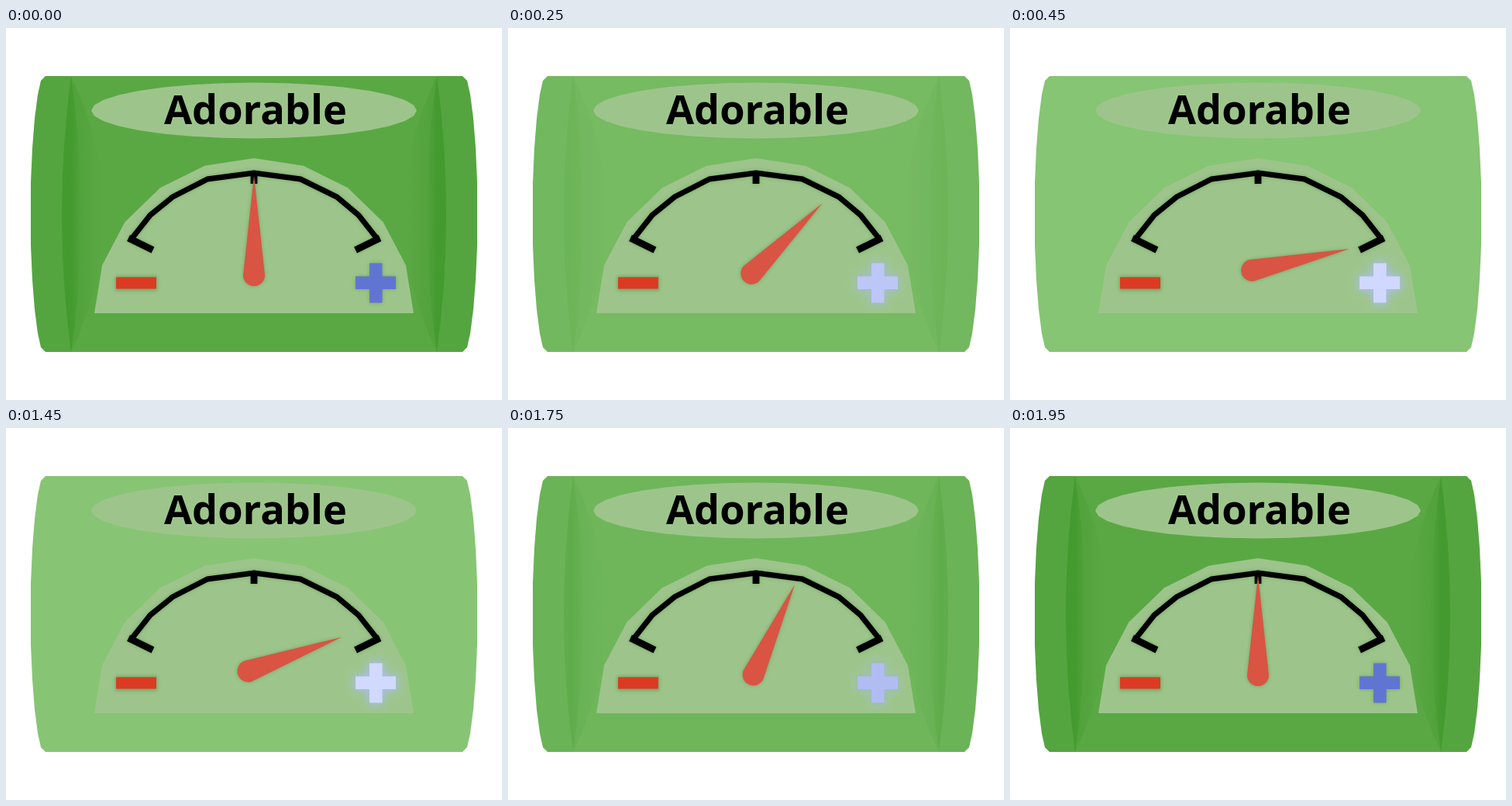
Write an HTML page that moves like this. It is 640 by 480 pixels and loops after 2000 ms.

```html
<!DOCTYPE html>
<html lang="en">
<head>
<meta charset="utf-8">
<title>Adorable meter</title>
<style>
html, body { margin: 0; width: 100%; height: 100%; overflow: hidden; background: #fff; }
svg { display: block; width: 100vw; height: 100vh; }
text { font: bold 52.3px "Open Sans", "Noto Sans", sans-serif; }
</style>
</head>
<body>
<svg viewBox="0 0 640 480">
  <defs>
    <filter id="soft" x="-50%" y="-50%" width="200%" height="200%"><feGaussianBlur stdDeviation="2.4"/></filter>
    <filter id="glow" x="-60%" y="-60%" width="220%" height="220%"><feGaussianBlur stdDeviation="6"/></filter>
    <linearGradient id="fadeIn" gradientUnits="userSpaceOnUse" x1="74" y1="0" x2="125" y2="0">
      <stop offset="0" stop-color="#3a9425" stop-opacity=".4"/>
      <stop offset="1" stop-color="#3a9425" stop-opacity="0"/>
    </linearGradient>
    <linearGradient id="fadeLens" gradientUnits="userSpaceOnUse" x1="70" y1="0" x2="98" y2="0">
      <stop offset="0" stop-color="#3a9425" stop-opacity=".45"/>
      <stop offset=".5" stop-color="#3a9425" stop-opacity=".55"/>
      <stop offset="1" stop-color="#3a9425" stop-opacity="0"/>
    </linearGradient>
    <clipPath id="shell"><path id="shellPath"/></clipPath>
    <g id="crease">
      <path d="M84 62Q60 240 84 418Q170 240 84 62Z" fill="url(#fadeIn)"/>
      <path d="M84 62Q60 240 84 418Q110 240 84 62Z" fill="url(#fadeLens)"/>
      <path d="M84 62Q60 240 84 418H30V62Z" fill="#3a9425" opacity=".17"/>
    </g>
    <path id="plusShape" d="M469 303.500h16.500v17H503v16.500h-17.500v17.500H469V337h-18v-16.500h18Z"/>
    <path id="pointer" d="M0 -120.500L14 8A14 14 0 1 1 -14 8Z"/>
    <g id="scale" fill="none" stroke-linejoin="miter">
      <path d="M162 272L186 241.500L215 218L260 195L320 187L380 195L427 218L455 241.500L479 272" stroke-width="7"/>
      <path d="M158 271L189.500 286.500M482.500 271L451 286.500M320 185V201" stroke-width="8.800"/>
    </g>
  </defs>
  <rect width="640" height="480" fill="#fff"/>
  <path id="body"/>
  <g id="shade" clip-path="url(#shell)">
    <use href="#crease"/>
    <use href="#crease" transform="translate(640) scale(-1 1)"/>
  </g>
  <g fill="#9dc58b">
    <polygon id="badge"/>
    <polygon id="dial"/>
  </g>
  <text x="204" y="124.300">Adorable</text>
  <g filter="url(#soft)" opacity=".55">
    <use href="#scale" stroke="#548a46"/>
    <rect x="141" y="320" width="54" height="19" fill="#548a46"/>
  </g>
  <use id="plusShade" href="#plusShape" fill="#548a46" filter="url(#soft)"/>
  <use id="plusGlow" href="#plusShape" fill="#aebcff" stroke="#aebcff" stroke-width="4" filter="url(#glow)"/>
  <use href="#scale" stroke="#000"/>
  <rect x="142" y="321.500" width="52" height="15" fill="#dc3b22"/>
  <use id="plus" href="#plusShape"/>
  <g id="needle">
    <use href="#pointer" fill="#548a46" opacity=".6" filter="url(#soft)"/>
    <use href="#pointer" fill="#d95443"/>
  </g>
</svg>
<script>
const $ = id => document.getElementById(id);
const STEP = 50, LOOP = 2000, HOLD_FROM = 450, HOLD_TO = 1450;

// Points on an ellipse, every `step` degrees from `from` to `to`.
function ring(cx, cy, rx, ry, step, from, to) {
  const pts = [];
  for (let a = from; a <= to; a += step) {
    const r = a * Math.PI / 180;
    pts.push((cx + rx * Math.cos(r)).toFixed(2) + "," + (cy - ry * Math.sin(r)).toFixed(2));
  }
  return pts.join(" ");
}

// The shell is mirrored left to right and top to bottom.
function shell() {
  const edge = [[51, 62], [45, 68], [41, 86], [37, 117], [34, 155], [32, 200]];
  const left = edge.concat(edge.slice().reverse().map(([x, y]) => [x, 480 - y]));
  const right = left.map(([x, y]) => [640 - x, y]).reverse();
  return "M" + left.concat(right).join("L") + "Z";
}

$("body").setAttribute("d", shell());
$("shellPath").setAttribute("d", shell());
$("badge").setAttribute("points", ring(320, 106.5, 210, 36, 11.25, 0, 350));
$("dial").setAttribute("points", ring(320, 368, 206, 200, 18, 0, 180));

const smooth = t => t * t * (3 - 2 * t);
const saturate = (v, k) => v * (1 + k) / (v + k);
const mix = (a, b, t) => `rgb(${a.map((v, i) => Math.round(v + (b[i] - v) * t))})`;

function stepAt(t) {
  if (t < HOLD_FROM) return Math.floor(t / STEP);
  if (t < HOLD_TO) return 9;
  return 10 + Math.floor((t - HOLD_TO) / STEP);
}

function draw(t) {
  const n = stepAt(t);
  const light = smooth(n <= 10 ? n / 10 : (20 - n) / 10);
  const angle = n < 10 ? 77.6 * smooth(n / 9) : 70 * smooth((20 - n) / 10);
  const shine = saturate(light, 0.27);
  $("body").setAttribute("fill", mix([90, 168, 68], [135, 197, 116], saturate(light, 1.5)));
  $("plus").setAttribute("fill", mix([96, 117, 210], [209, 217, 255], shine));
  $("plusGlow").setAttribute("opacity", 0.85 * Math.sqrt(light));
  $("plusShade").setAttribute("opacity", 0.6 * (1 - shine));
  $("shade").setAttribute("opacity", Math.pow(1 - light, 2.2));
  $("needle").setAttribute("transform", `translate(320 311) rotate(${angle})`);
}

const start = performance.now();
function tick() {
  draw((performance.now() - start) % LOOP);
  requestAnimationFrame(tick);
}
draw(0);
requestAnimationFrame(tick);
</script>
</body>
</html>
```
